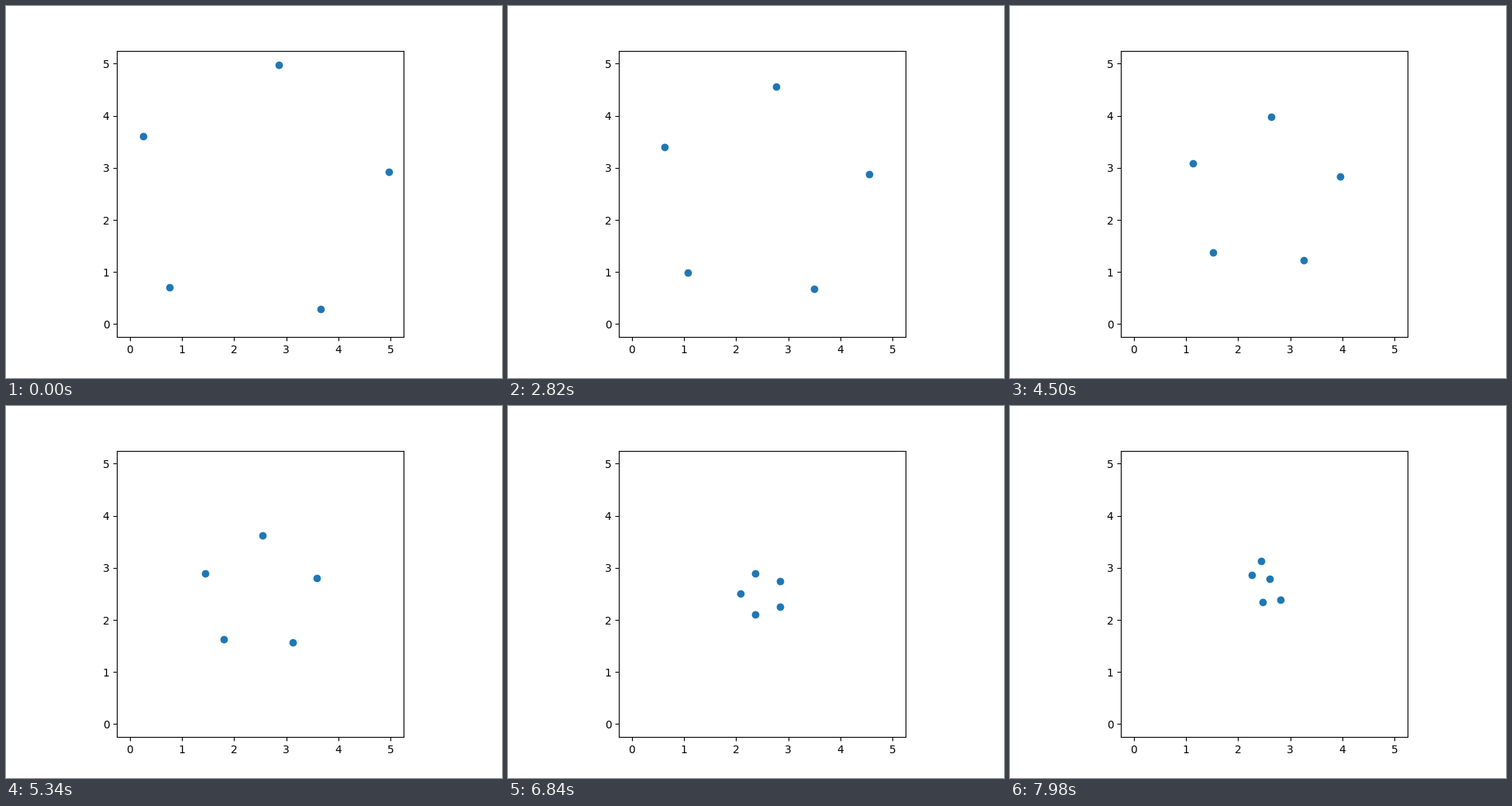
A matplotlib script that plays this animation: 640x480 px, repeating every 8000 ms.

```python
import numpy as np
import matplotlib.pyplot as plt
from matplotlib.animation import FuncAnimation

FRAMES, INTERVAL = 400, 20
CENTER = 2.5 + 2.5j
RADIUS = 2.5
UNIT = 67.2            # pixels per data unit
OMEGA = 0.2075         # rate of the harmonic fall
SWIRL = 0.266 / UNIT   # steady sideways push
ENCOUNTER = 7.18       # seconds until the dots first meet

headings = np.exp(1j * np.radians(9.7 + 72 * np.arange(5)))
bounce = np.array([np.inf, ENCOUNTER, 7.82, np.inf, np.inf])
# Deflection speed of each dot: real part outward, imaginary part sideways
kick = np.array([3.2 + 11.9j, -1.1j, -6j, 5.9 + 3.8j, -1.8j]) / UNIT


def positions(t):
    # A dot that bounces runs back along its own path
    path_time = t - 2 * np.maximum(t - bounce, 0)
    offset = RADIUS * np.cos(OMEGA * path_time) + 1j * SWIRL * path_time ** 2
    offset = offset + kick * max(t - ENCOUNTER, 0)
    points = CENTER + headings * offset
    return points.real, points.imag


fig, ax = plt.subplots(figsize=(6.4, 4.8), dpi=100)
ax.set_aspect("equal")
ax.set(xlim=(-0.25, 5.25), ylim=(-0.25, 5.25),
       xticks=range(6), yticks=range(6))
ax.tick_params(axis="y", pad=3.54)
dots, = ax.plot(*positions(0), "o", color="#1f77b4")


def update(frame):
    dots.set_data(*positions(frame * INTERVAL / 1000))
    return dots,


anim = FuncAnimation(fig, update, frames=FRAMES, interval=INTERVAL,
                     repeat=True, repeat_delay=0)
plt.show()
```
